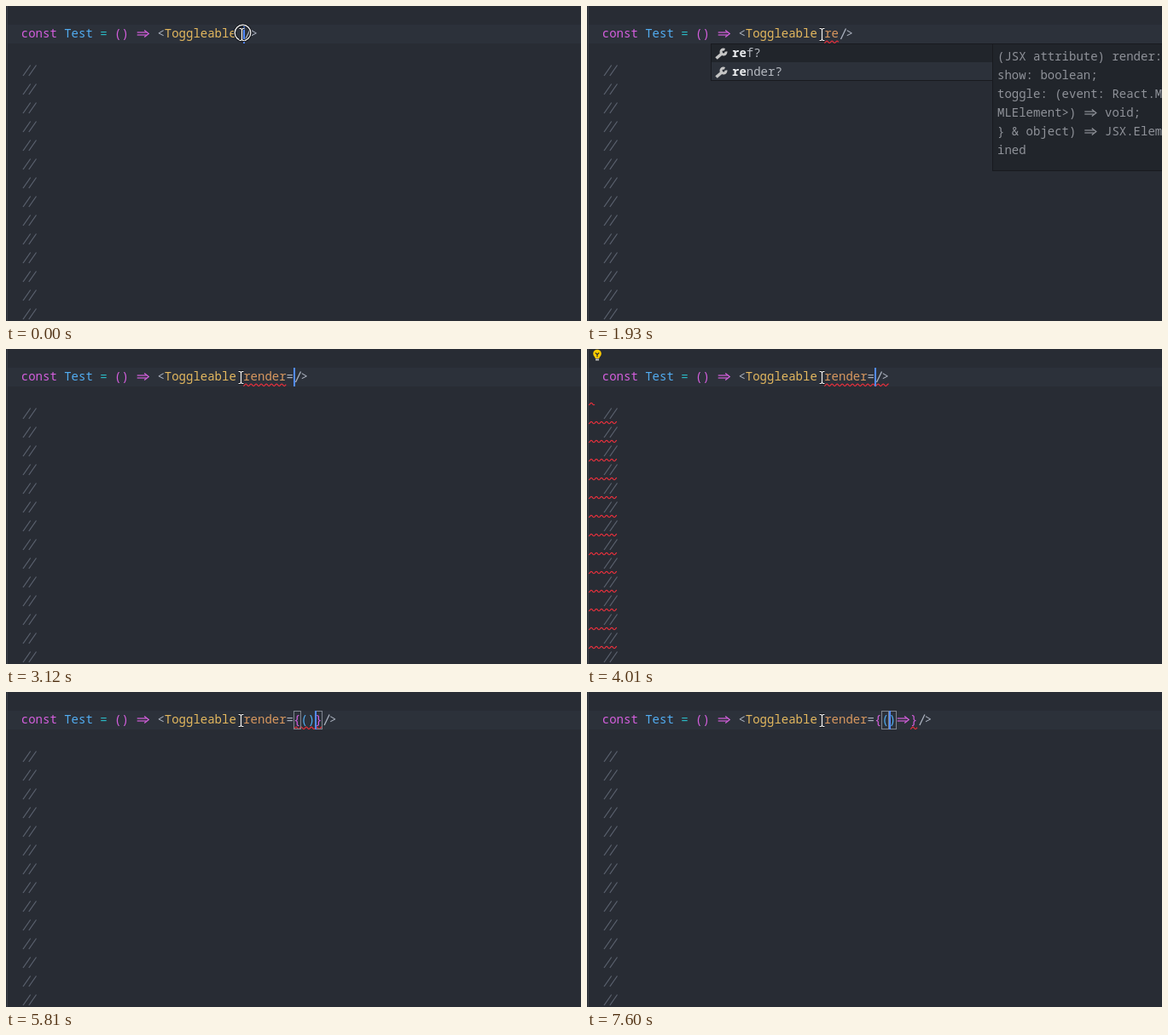
An HTML page with a canvas for the animation above (8 s loop, 674x370 px).

```html
<!DOCTYPE html>
<html lang="en">
<head>
<meta charset="utf-8">
<title>Editor typing</title>
<style>
  html, body { margin: 0; width: 100%; height: 100%; overflow: hidden; background: #282c34; }
  canvas { display: block; }
</style>
</head>
<body>
<canvas id="stage" width="674" height="370"></canvas>
<script>
const ctx = document.getElementById('stage').getContext('2d');
const LOOP = 8000, LEFT = 17.8, CHAR = 8.4, ROW = 22;
const FONT = '"Noto Sans Mono", "DejaVu Sans Mono", monospace';
const C = {
  bg: '#282c34', line: '#2c313a', panel: '#21252b', edge: '#181a1f', rule: '#3b4048',
  pink: '#d55fde', blue: '#52adf2', teal: '#2bbac5', gold: '#e5b95f', orange: '#d8985f',
  plain: '#abb2bf', comment: '#5c6370', doc: '#8f9299', caret: '#528bff', red: '#e5303c'
};
const ATTR = 31; // column where the attribute starts
const DOC = ['(JSX attribute) render: ', 'show: boolean;', 'toggle: (event: React.MouseEvent',
  'MLElement>) => void;', '} & object) => JSX.Element', 'ined'];

// Each step changes part of the editor state; columns count from ATTR.
const steps = [
  [0, { code: '', caret: 0, on: true, click: true, wave: null, boxes: [], popup: 0, errors: false }],
  [150, { click: false }],
  [300, { code: 'r', caret: 1 }],
  [450, { code: 're', caret: 2, wave: [0, 2] }],
  [890, { popup: 295 }],
  [1040, { popup: 145, on: false }],
  [1490, { on: true }],
  [1930, { on: false }],
  [2080, { popup: 0, code: 'render', caret: 6, on: true }],
  [2380, { wave: [0, 6] }],
  [2530, { on: false }],
  [2970, { on: true }],
  [3120, { code: 'render=', caret: 7 }],
  [3410, { errors: true, wave: [0, 9] }],
  [3560, { on: false }],
  [4010, { on: true }],
  [4310, { code: 'render={}', caret: 8, wave: [0, 11] }],
  [4460, { boxes: [7, 8] }],
  [4610, { errors: false, wave: [7, 9] }],
  [4760, { on: false }],
  [5060, { on: true }],
  [5510, { code: 'render={()}', caret: 9, boxes: [7, 10], wave: [7, 11] }],
  [5810, { caret: 10 }],
  [5960, { code: 'render={()=}', caret: 11, boxes: [7, 11], wave: [7, 12] }],
  [6260, { code: 'render={()=>}', caret: 12, boxes: [7, 12], wave: [7, 13] }],
  [6410, { wave: [12, 13] }],
  [6710, { caret: 11 }],
  [6860, { caret: 9 }],
  [7310, { on: false, boxes: [] }],
  [7460, { boxes: [8, 9] }],
  [7600, { on: true }]
];

const stateAt = t => Object.assign({}, ...steps.filter(s => s[0] <= t).map(s => s[1]));
const colX = col => LEFT + col * CHAR;

function rect(x, y, w, h, color) {
  ctx.fillStyle = color;
  ctx.fillRect(x, y, w, h);
}

function path(points, color, width) {
  ctx.beginPath();
  points.forEach(([x, y]) => ctx.lineTo(x, y));
  ctx.strokeStyle = color;
  ctx.lineWidth = width;
  ctx.stroke();
}

function arrow(x, base, color) {
  path([[x + 1.5, base - 6], [x + 12.5, base - 6]], color, 1.2);
  path([[x + 1.5, base - 3], [x + 12.5, base - 3]], color, 1.2);
  path([[x + 10, base - 8.5], [x + 15, base - 4.5], [x + 10, base - 0.5]], color, 1.3);
}

// Writes monospaced text, joining "=>" into one arrow.
function write(text, x, base, color, weight = 500) {
  ctx.font = `${weight} 14px ${FONT}`;
  text.split('=>').forEach((part, i) => {
    if (i) {
      arrow(x, base, color);
      x += 2 * CHAR;
    }
    ctx.fillStyle = color;
    ctx.fillText(part, x, base);
    x += part.length * CHAR;
  });
  return x;
}

function squiggle(x1, x2, y) {
  const points = [];
  for (let x = x1; x <= x2; x += 0.5) points.push([x, y + 1.2 * Math.cos((x - x1) * Math.PI / 3)]);
  path(points, C.red, 1.2);
}

function wrench(x, y) {
  path([[x - 5.5, y + 5.5], [x + 2, y - 1]], '#c5c5c5', 3.6);
  ctx.beginPath();
  ctx.arc(x + 3, y - 2, 3, -0.15, Math.PI * 1.65);
  ctx.lineWidth = 3;
  ctx.stroke();
}

function bulb() {
  ctx.fillStyle = '#ffcc00';
  ctx.beginPath();
  ctx.arc(12, 5.5, 4.8, 0, Math.PI * 2);
  ctx.fill();
  rect(9.5, 8, 5, 3, '#ffcc00');
  path([[9.8, 4.5], [12, 6.5], [14.2, 4.5]], C.bg, 1.1);
  path([[12, 6.5], [12, 9.5]], C.bg, 1.1);
  rect(10, 11.5, 4, 2, '#c5c5c5');
}

function panel(x, y, w, h) {
  rect(x, y, w, h, C.edge);
  rect(x + 1, y + 1, w - 2, h - 2, C.panel);
}

function popup(x) {
  const docs = x < 200;
  panel(x, 44, docs ? 331 : 400, 44);
  rect(x + 1, 66, docs ? 329 : 398, 21, C.line);
  ['f?', 'nder?'].forEach((rest, i) => {
    const base = 60 + i * ROW;
    wrench(x + 12, base - 4);
    write(rest, write('re', x + 25, base, '#eceef0', 700), base, '#b5b9c0');
  });
  if (!docs) return;
  panel(475, 44, 220, 150);
  DOC.forEach((text, i) => write(text, 481, 64 + i * ROW, C.doc));
}

function beam(x) {
  for (const [color, width] of [['#15171b', 3], ['#f4f4f4', 1.2]]) {
    path([[x - 3, 26.5], [x - 1, 26.5], [x, 28], [x, 39], [x - 1, 40.5], [x - 3, 40.5]], color, width);
    path([[x + 3, 26.5], [x + 1, 26.5], [x, 28], [x, 39], [x + 1, 40.5], [x + 3, 40.5]], color, width);
  }
}

function clickRing() {
  for (const [color, width] of [['#15171b', 3], ['#f4f4f4', 1.3]]) {
    ctx.beginPath();
    ctx.arc(277.5, 31.5, 9.3, 0, Math.PI * 2);
    ctx.strokeStyle = color;
    ctx.lineWidth = width;
    ctx.stroke();
  }
}

function codeLine(code) {
  const put = (text, col, color) => write(text, colX(col), 37, color);
  put('const', 0, C.pink);
  put('Test', 6, C.blue);
  put('=', 11, C.teal);
  put('() =>', 13, C.pink);
  put('<', 19, C.plain);
  put('Toggleable', 20, C.gold);
  put(code.slice(0, 6), ATTR, C.orange);
  put(code.slice(6, 7), ATTR + 6, C.plain);
  put(code.slice(7, 8), ATTR + 7, C.pink);
  const value = code.slice(8);
  const args = value.startsWith('()') ? 2 : 0;
  put(value.slice(0, args), ATTR + 8, C.blue);
  put(value.slice(args), ATTR + 8 + args, C.pink);
  const end = colX(ATTR + code.length);
  path([[end + 2.5, 39], [end + 8.5, 26.5]], C.plain, 1.3);
  write('>', end + CHAR, 37, C.plain);
}

function comments() {
  for (let y = 76; y < 370; y += ROW) {
    for (const x of [20, 26.8]) path([[x, y + 6], [x + 8.7, y - 6.5]], C.comment, 1.2);
  }
}

function draw(t) {
  const s = stateAt(t);
  rect(0, 0, 674, 370, C.bg);
  rect(2, 22, 672, ROW, C.line);
  rect(1, 0, 1, 370, C.rule);
  comments();
  codeLine(s.code);
  if (s.wave) squiggle(colX(ATTR + s.wave[0]), colX(ATTR + s.wave[1]), 42.3);
  if (s.errors) {
    bulb();
    for (let y = 64.5; y < 352; y += ROW) squiggle(2, y < 66 ? 9 : 35, y);
  }
  ctx.strokeStyle = '#7f8590';
  ctx.lineWidth = 1;
  for (const col of s.boxes) ctx.strokeRect(Math.round(colX(ATTR + col)) + 0.5, 22.5, 8, 21);
  if (s.on) rect(Math.round(colX(ATTR + s.caret)), 22, 2, ROW, C.caret);
  if (s.popup) popup(s.popup);
  if (s.click) clickRing();
  beam(s.click ? 276.5 : 275.5);
}

function tick() {
  draw(performance.now() % LOOP);
  requestAnimationFrame(tick);
}
tick();
</script>
</body>
</html>
```
